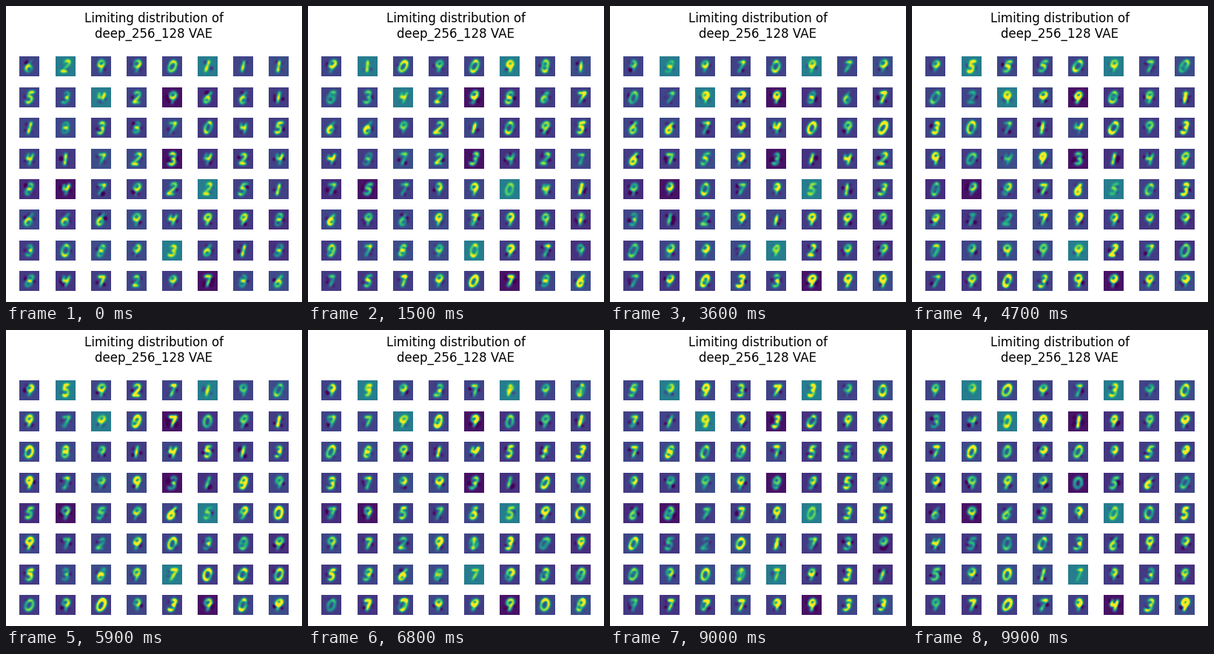
Write a matplotlib script that moves like this. It is 400x400 px and loops after 10 s.

```python
import numpy as np
import matplotlib.pyplot as plt
from matplotlib.animation import FuncAnimation

FRAMES, INTERVAL = 100, 100
GRID, RES, SAMPLES = 8, 28, 40
CELLS = GRID * GRID
LEFT, TOP, SIDE = 18.45, 68.45, 27
STEP_X, STEP_Y = 48.1, 41.4
TEAL, DARK = [1, 5, 10, 37, 52], [12, 28, 33, 61]

rng = np.random.default_rng(12)


def arc(cx, cy, rx, ry, start, stop):
    a = np.radians(np.linspace(start, stop, 24))
    return list(zip(cx + rx * np.cos(a), cy + ry * np.sin(a)))


def resample(points):
    """Even spacing along the stroke."""
    p = np.array(points, float)
    s = np.r_[0, np.cumsum(np.hypot(*np.diff(p, axis=0).T))]
    u = np.linspace(0, s[-1], SAMPLES)
    return np.column_stack([np.interp(u, s, p[:, 0]), np.interp(u, s, p[:, 1])])


# One pen stroke per digit, 0 to 9, in a box of -1..1 with y down.
STROKES = np.array([resample(p) for p in (
    arc(0, 0, 1, 1, -90, 270),
    [(0, -1), (0, 1)],
    arc(0, -.5, .8, .5, -160, 40) + [(-.8, .9), (.9, .9)],
    arc(0, -.5, .75, .5, -150, 90) + arc(0, .5, .85, .5, -90, 150),
    [(-.7, -.9), (-.8, 0), (.6, 0), (.8, -.9), (.5, 1)],
    [(.8, -1), (-.5, -.9), (-.6, -.1)] + arc(0, .4, .8, .6, -120, 150),
    [(.5, -1), (-.5, -.1)] + arc(0, .45, .8, .55, 180, 540),
    [(-.9, -.8), (.8, -.9), (0, 1)],
    arc(0, -.5, .75, .5, 90, 450) + arc(0, .5, .8, .5, -90, 270),
    arc(0, -.45, .85, .55, 0, -360) + [(.6, -.2), (.2, 1)],
)])


class Drift:
    """Smooth wander in -1..1, a function of the frame number alone."""

    def __init__(self, *shape):
        self.freq = rng.uniform(.01, .035, (2, *shape))
        self.phase = rng.uniform(0, 2 * np.pi, (2, *shape))

    def __call__(self, n):
        return np.sin(2 * np.pi * self.freq * n + self.phase).mean(axis=0)


def digit_chains(keys):
    """Start from any digit, then favour 9, 7 and 0 more and more."""
    pull = np.array([2.2, .9, .3, .8, .4, .5, .5, 2, .3, 4.5])
    chain = [rng.integers(0, 10, CELLS)]
    for k in range(1, keys):
        odds = pull ** min(1, .4 + .2 * k)
        fresh = rng.choice(10, CELLS, p=odds / odds.sum())
        chain.append(np.where(rng.random(CELLS) < .35, chain[-1], fresh))
    return np.array(chain).T


KEYS = 9
chain = digit_chains(KEYS)
knots = np.tile(np.linspace(0, FRAMES - 1, KEYS), (CELLS, 1))
knots[:, 1:-1] += rng.uniform(-4, 4, (CELLS, KEYS - 2))

level = rng.normal(.19, .03, CELLS)
level[TEAL], level[DARK] = .42, .05
level = level[:, None, None]
peak = rng.uniform(.75, 1.35, CELLS)

shift_x, shift_y, slant, width, height, gain, accent = (
    Drift(CELLS) for _ in range(7))
accent_base = rng.uniform(0, 2 * np.pi, CELLS)
BLOBS = 5
blob_angle = rng.uniform(0, 2 * np.pi, (CELLS, BLOBS))
blob_turn, blob_depth = Drift(CELLS, BLOBS), Drift(CELLS, BLOBS)
axis = np.arange(RES)
everyone = np.arange(CELLS)


def splat(x, y, weight, sigma):
    """Sum of Gaussian spots for every cell."""
    gx = np.exp(-((x[..., None] - axis) / sigma) ** 2 / 2)
    gy = np.exp(-((y[..., None] - axis) / sigma) ** 2 / 2) * weight[..., None]
    return np.swapaxes(gy, 1, 2) @ gx


def place(points, n):
    def col(drift):
        return drift(n)[:, None]

    y = points[..., 1] * (7.6 + .6 * col(height))
    x = points[..., 0] * (4.9 + .6 * col(width)) - y * (.25 + .15 * col(slant))
    return x + 13.5 + .6 * col(shift_x), y + 13.5 + .4 * col(shift_y)


def fields(n):
    k = np.clip((knots <= n).sum(axis=1) - 1, 0, KEYS - 2)
    t0, t1 = knots[everyone, k], knots[everyone, k + 1]
    u = np.clip(((n - t0) / (t1 - t0) - .5) * 1.3 + .5, 0, 1)
    mix = (u * u * (3 - 2 * u))[:, None]

    wave = np.linspace(0, 3 * np.pi, SAMPLES)
    turn = (accent_base + 3 * accent(n))[:, None]
    weight = .75 + .25 * np.sin(wave + turn)

    ink = 0
    for digit, share in ((chain[everyone, k], 1 - mix),
                         (chain[everyone, k + 1], mix)):
        x, y = place(STROKES[digit], n)
        ink = ink + splat(x, y, weight * share, 1.65)
    ink = np.tanh(1.3 * ink / ink.max(axis=(1, 2), keepdims=True)) / np.tanh(1.3)

    a = blob_angle + 1.2 * blob_turn(n)
    dark = splat(13.5 + 6 * np.cos(a), 13.5 + 6.5 * np.sin(a),
                 .6 + .6 * blob_depth(n), 1.9)

    ramp = min(n / 14, 1)
    amp = 1 + ramp * (peak - 1 + .2 * gain(n))
    return (level + (1 - level) * amp[:, None, None] * ink
            - .25 * dark * (1 - ink))


fig = plt.figure(figsize=(4, 4), dpi=100, facecolor="white")
fig.suptitle("Limiting distribution of\ndeep_256_128 VAE",
             fontsize=12, family="DejaVu Sans")
ax = fig.add_axes([0, 0, 1, 1])
ax.axis("off")

images = []
for i, field in enumerate(fields(0)):
    row, col = divmod(i, GRID)
    x, y = round(LEFT + col * STEP_X), round(TOP + row * STEP_Y)
    images.append(ax.imshow(field, cmap="viridis", vmin=0, vmax=1,
                            extent=(x, x + SIDE, y + SIDE, y)))
ax.set(xlim=(0, 400), ylim=(400, 0), aspect="auto")


def update(n):
    for image, field in zip(images, fields(n)):
        image.set_data(field)
    return images


anim = FuncAnimation(fig, update, frames=FRAMES, interval=INTERVAL,
                     repeat=True, repeat_delay=0)
plt.show()
```
